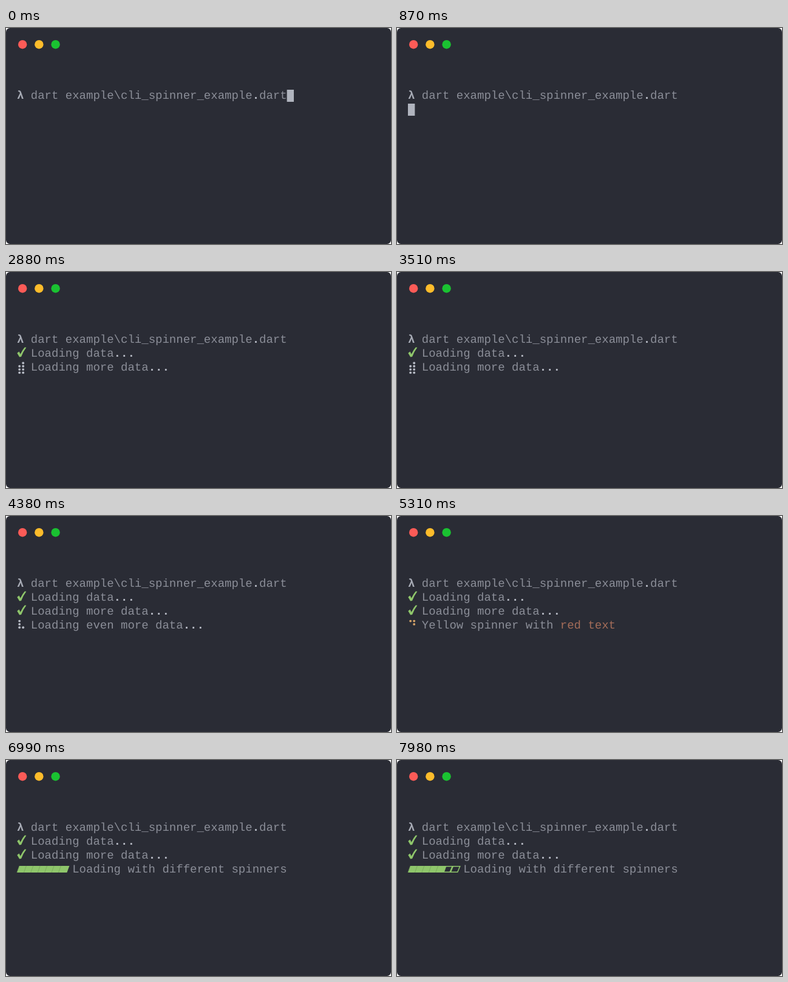
An HTML page with a canvas that plays this animation: 634 px wide and 357 px high, repeating every 8 s.

```html
<!DOCTYPE html>
<html lang="en">
<head>
<meta charset="utf-8">
<title>CLI spinner</title>
<style>
html, body { margin: 0; width: 100%; height: 100%; overflow: hidden; background: #fff; }
canvas { display: block; }
</style>
</head>
<body>
<canvas id="stage" width="634" height="357"></canvas>
<script>
const ctx = document.getElementById('stage').getContext('2d');
const LOOP = 8000, TICK = 71;
const LEFT = 18, COL = 11.4, ROW = 23.1;
const BG = '#2a2c35', TEXT = '#8b8e98', BRIGHT = '#b6bac4';
const GREEN = '#8fc66b', YELLOW = '#d3a268', RED = '#a56d59';
const DOTS = '⠋⠙⠹⠸⠼⠴⠦⠧⠇⠏', DOTS2 = '⣾⣽⣻⢿⡿⣟⣯⣷';

// Messages that share the last line; the spinner keeps running through them.
const messages = [
  { at: 3690, text: 'Loading even more data...' },
  { at: 4470, text: 'Loading with different colours...' },
  { at: 5310, text: 'Yellow spinner with ', red: 'red text', color: YELLOW },
  { at: 6180, text: 'Loading with indent', color: GREEN, indent: 2 }
];

const colX = col => LEFT + col * COL;
const mod = (n, m) => ((n % m) + m) % m;

function write(text, col, row, color = TEXT, weight = '') {
  ctx.font = `${weight} 19px "Courier New", "Liberation Mono", monospace`;
  ctx.fillStyle = color;
  ctx.fillText(text, colX(col), 117 + row * ROW);
}

// Terminal text with its full stops standing out.
function print(text, col, row) {
  write(text, col, row);
  write(text.replace(/[^.]/g, ' '), col, row, BRIGHT, 'bold');
}

function circle(x, y, r, color) {
  ctx.fillStyle = color;
  ctx.beginPath();
  ctx.arc(x, y, r, 0, 7);
  ctx.fill();
}

function cursor(col, row) {
  ctx.fillStyle = '#b0b4be';
  ctx.fillRect(colX(col), 102 + row * 23, 11.4, 20);
}

// Each bit of a braille code point is one dot: 1-3 left, 4-6 right, 7-8 bottom.
function braille(char, col, row, color = BRIGHT) {
  const bits = char.charCodeAt(0) - 0x2800;
  for (let i = 0; i < 8; i++) {
    if (!(bits >> i & 1)) continue;
    const right = i < 6 ? i > 2 : i === 7;
    const line = i < 6 ? i % 3 : 3;
    circle(colX(col) + (right ? 10.2 : 4.2), 104.3 + row * ROW + line * 5.3, 1.95, color);
  }
}

function check(row) {
  ctx.save();
  ctx.translate(LEFT, 101.4 + row * ROW);
  ctx.fillStyle = GREEN;
  ctx.fill(new Path2D('M.3 9.4 L3.6 7 L5.7 11.2 Q9 4.2 12.8 0 L15.4 .2 Q10.2 7 7.1 15.5 L4.1 15.9 Z'));
  ctx.restore();
}

function bar(filled) {
  for (let i = 0; i < 7; i++) {
    const x = colX(i), inset = i < filled ? 0 : .7;
    ctx.beginPath();
    ctx.moveTo(x + 4 + inset, 175 + inset);
    ctx.lineTo(x + 18 - inset, 175 + inset);
    ctx.lineTo(x + 14 - inset, 186 - inset);
    ctx.lineTo(x + inset, 186 - inset);
    ctx.closePath();
    if (i < filled) {
      ctx.fillStyle = GREEN;
      ctx.fill();
      ctx.beginPath();
      ctx.moveTo(x + 4, 175);
      ctx.lineTo(x, 186);
      ctx.strokeStyle = '#74a15a';
      ctx.lineWidth = .7;
    } else {
      ctx.strokeStyle = GREEN;
      ctx.lineWidth = 1.5;
    }
    ctx.stroke();
  }
}

// A line that spins from start to end and then gets its check mark.
function task(t, text, row, start, end) {
  if (t < start) return;
  print(text, 2, row);
  if (t < end) braille(DOTS2[Math.floor((t - start) / TICK) % 8], 0, row);
  else check(row);
}

function lastLine(t) {
  if (t >= 6990) {
    const step = (Math.floor((t - 6990) / 70.7) + 6) % 8;
    bar(step === 7 ? 1 : step + 1);
    print('Loading with different spinners', 8, 3);
    return;
  }
  const msg = messages.filter(m => t >= m.at).pop();
  if (!msg) return;
  const indent = msg.indent || 0, step = Math.floor((t - 5310) / TICK) + 1;
  braille(DOTS[mod(step, 10)], indent, 3, msg.color);
  print(msg.text, indent + 2, 3);
  if (msg.red) write(msg.red, indent + 2 + msg.text.length, 3, RED);
}

function draw(t) {
  ctx.clearRect(0, 0, 634, 357);
  ctx.fillStyle = BG;
  ctx.beginPath();
  ctx.roundRect(0, 0, 634, 357, 6.5);
  ctx.fill();
  ['#fc5b57', '#fdbc2b', '#1ac231'].forEach((color, i) => circle(27.2 + i * 27.2, 27.2, 7.2, color));

  write('λ', 0, 0, '#a9adb7', 'bold');
  print('dart example\\cli_spinner_example.dart', 2, 0);
  if (t < 840) cursor(39, 0);
  else if (t < 1080) cursor(0, 1);
  else if (t >= 1890 && t < 2880) cursor(0, 2);

  task(t, 'Loading data...', 1, 1080, 1890);
  task(t, 'Loading more data...', 2, 2880, 3690);
  lastLine(t);
}

ctx.textRendering = 'geometricPrecision';
const begin = performance.now();
function frame() {
  draw((performance.now() - begin) % LOOP);
  requestAnimationFrame(frame);
}
frame();
</script>
</body>
</html>
```
